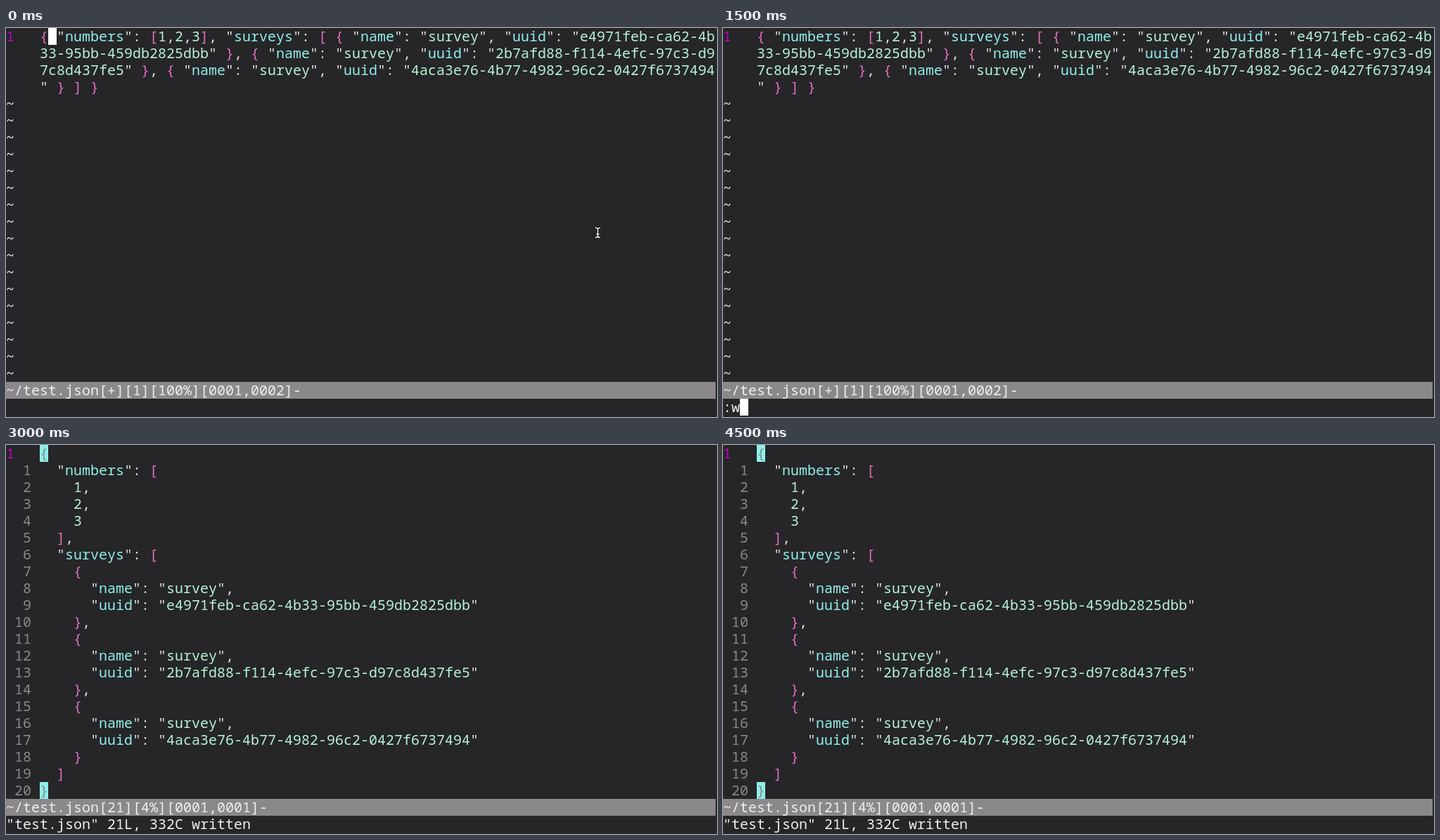
An HTML page for the animation above (5 s loop, 1011x554 px).

```html
<!DOCTYPE html>
<html lang="en">
<head>
<meta charset="utf-8">
<title>Formatting JSON on save</title>
<style>
  :root {
    --bg: #262527; --fg: #f0eff0; --gray: #8a888a;
    --cyan: #8df0ea; --mint: #b4f3d6; --pink: #e26fc0;
  }
  html, body { margin: 0; width: 100%; height: 100%; overflow: hidden; background: var(--bg); }
  #stage {
    position: relative; width: 1011px; height: 554px; overflow: hidden;
    background: var(--bg); color: var(--fg);
    font: 20px/24px "Noto Sans Mono", "DejaVu Sans Mono", monospace;
    font-variant-ligatures: none;
  }
  #stage > * { position: absolute; left: 0; top: 0; }
  .row { height: 24px; white-space: pre; }
  .key { color: var(--cyan); }
  .val { color: var(--mint); }
  .brace { color: var(--pink); }
  .punct { color: #e2e1e3; }
  .nr { color: var(--gray); }
  .cur { color: #c400c4; }
  .status { top: 504px !important; width: 1009px; background: var(--gray); }
  .cmd { top: 528px !important; }
  .block { width: 12px; height: 24px; background: #fff; }
  .cell { display: inline-block; width: 12px; height: 24px; vertical-align: top; background: var(--cyan); color: var(--gray); }

  .flat, .nice, .caret, .mouse, .typed, .typed-caret, .match { animation: 5s step-end infinite; }
  .flat { animation-name: flat; }
  .nice { animation-name: nice; }
  .caret { left: 60px !important; animation-name: caret; }
  .mouse { animation-name: mouse; }
  .typed { animation-name: typed; }
  .typed-caret { left: 24px !important; top: 528px !important; animation-name: typed-caret; }
  .match { animation-name: match; }
  @keyframes flat { 0% { opacity: 1 } 50%, 100% { opacity: 0 } }
  @keyframes nice { 0% { opacity: 0 } 50%, 100% { opacity: 1 } }
  @keyframes caret { 0%, 20% { opacity: 1 } 10%, 30%, 100% { opacity: 0 } }
  @keyframes mouse { 0% { opacity: 1 } 20%, 100% { opacity: 0 } }
  @keyframes typed { 0%, 50%, 100% { opacity: 0 } 30% { opacity: 1 } }
  @keyframes typed-caret { 0%, 40%, 100% { opacity: 0 } 30% { opacity: 1 } }
  @keyframes match {
    0%, 50%, 70% { background: var(--gray); color: var(--mint) }
    60%, 90%, 100% { background: var(--cyan); color: var(--gray) }
  }
</style>
</head>
<body>
<div id="stage">
  <div id="flat" class="flat"></div>
  <div id="nice" class="nice"></div>
  <div class="row status flat">~/test.json[+][1][100%][0001,0002]-</div>
  <div class="row status nice">~/test.json[21][4%][0001,0001]-</div>
  <div class="row cmd typed">:w</div>
  <div class="row cmd nice">"test.json" 21L, 332C written</div>
  <div class="block caret"></div>
  <div class="block typed-caret"></div>
  <svg class="mouse" width="1011" height="554" fill="none">
    <path id="beam" d="M838 284.5q3 0 3.5 2q.5-2 3.5-2M841.5 286v11M838 298.5q3 0 3.5-2q.5 2 3.5 2M839.5 293.5h4" stroke="#111" stroke-width="3.4"/>
    <use href="#beam"/>
    <path d="M838 284.5q3 0 3.5 2q.5-2 3.5-2M841.5 286v11M838 298.5q3 0 3.5-2q.5 2 3.5 2M839.5 293.5h4" stroke="#fff" stroke-width="1.4"/>
  </svg>
</div>
<script>
  const uuids = [
    'e4971feb-ca62-4b33-95bb-459db2825dbb',
    '2b7afd88-f114-4efc-97c3-d97c8d437fe5',
    '4aca3e76-4b77-4982-96c2-0427f6737494'
  ];
  const data = { numbers: [1, 2, 3], surveys: uuids.map(uuid => ({ name: 'survey', uuid })) };

  const span = (cls, text) => `<span class="${cls}">${text}</span>`;
  const row = html => `<div class="row">${html}</div>`;

  // Splits JSON into [class, character] pairs.
  function colour(text) {
    const out = [];
    const add = (cls, s) => { for (const ch of s) out.push([cls, ch]); };
    for (const [tok, str, colon] of text.matchAll(/"([^"]*)"(:?)|[\s\S]/g)) {
      if (str !== undefined) {
        add('punct', '"');
        add(colon ? 'key' : 'val', str);
        add('punct', '"' + colon);
      } else {
        add(/[{}[\]]/.test(tok) ? 'brace' : /\d/.test(tok) ? 'val' : 'punct', tok);
      }
    }
    return out;
  }

  // Joins neighbours of one class into a single span.
  function paint(chars) {
    let html = '', run = '', last = null;
    for (const [cls, ch] of chars) {
      if (cls !== last && run) { html += span(last, run); run = ''; }
      last = cls;
      run += ch;
    }
    return html + (run ? span(last, run) : '');
  }

  const items = data.surveys.map(s => `{ "name": "${s.name}", "uuid": "${s.uuid}" }`);
  const chars = colour(`{ "numbers": [${data.numbers}], "surveys": [ ${items.join(', ')} ] }`);
  let flat = '';
  for (let i = 0; i < chars.length; i += 80) {
    flat += row((i ? '    ' : span('cur', '1   ')) + paint(chars.slice(i, i + 80)));
  }
  document.getElementById('flat').innerHTML = flat + row('~').repeat(17);

  const lines = JSON.stringify(data, null, 2).split('\n');
  document.getElementById('nice').innerHTML = lines.map((line, i) => {
    const nr = i ? span('nr', String(i).padStart(3) + ' ') : span('cur', '1   ');
    const edge = i === 0 ? 'cell match' : i === lines.length - 1 ? 'cell' : '';
    return row(nr + (edge ? span(edge, line) : paint(colour(line))));
  }).join('');
</script>
</body>
</html>
```
